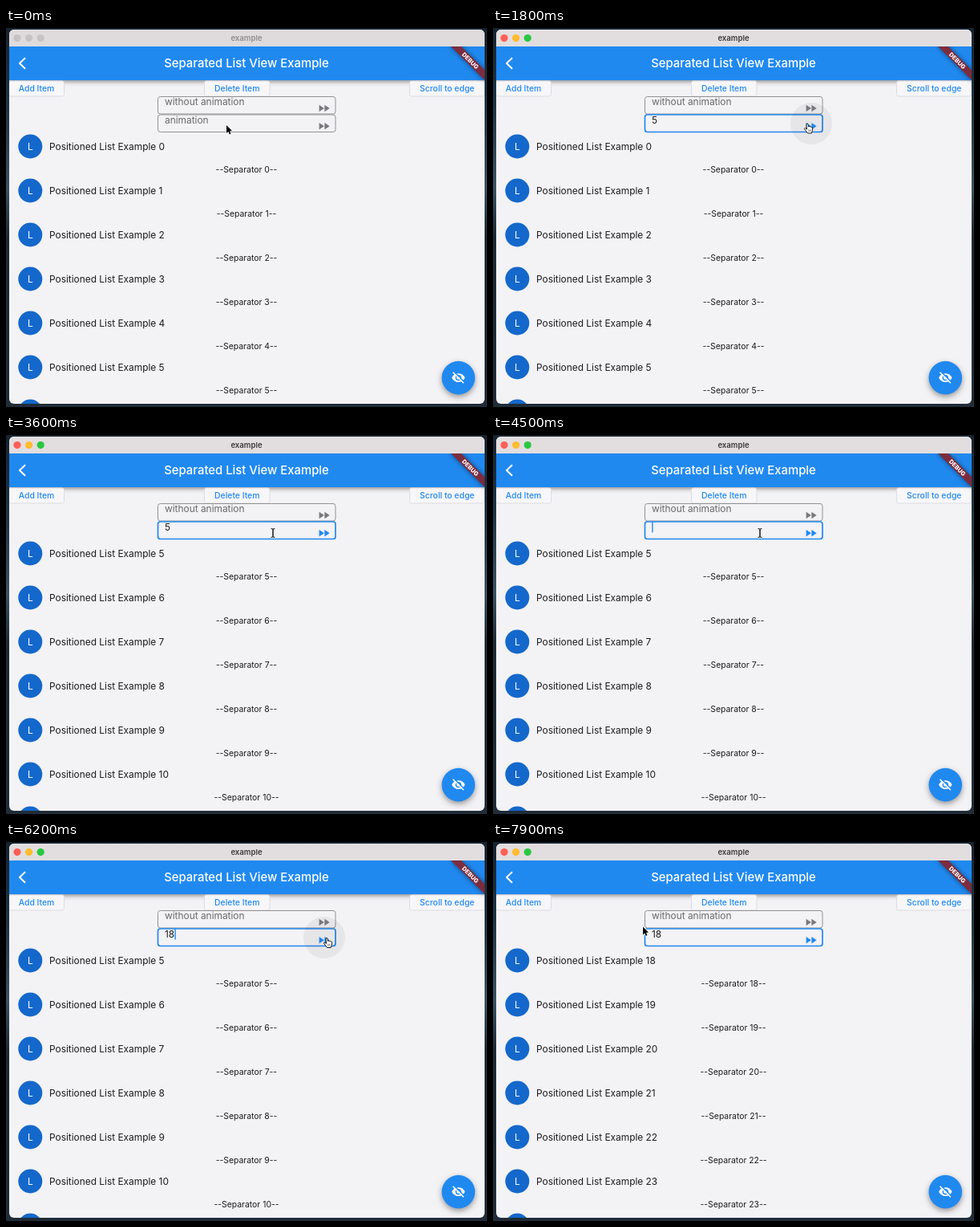
Animation of 600x472 px, one loop 8000 ms. Source, as an HTML page with a canvas:

```html
<!DOCTYPE html>
<html lang="en">
<head>
<meta charset="utf-8">
<title>Separated list</title>
<style>
html, body { margin: 0; width: 100%; height: 100%; overflow: hidden; background: #1b2732; }
canvas { display: block; width: 600px; height: 472px; }
</style>
</head>
<body>
<canvas id="stage"></canvas>
<script>
const canvas = document.getElementById('stage');
const ratio = window.devicePixelRatio || 1;
canvas.width = 600 * ratio;
canvas.height = 472 * ratio;
const c = canvas.getContext('2d');

const LOOP = 8000, STEP = 100, ROW = 55;
const BLUE = '#2089f0', PAPER = '#f3f2f5', INK = '#1c1c1e';

// Pointer stops: time, x, y
const POINTER = [
  [0, 275, 121], [1100, 275, 121], [1700, 392, 119], [2600, 392, 119],
  [3300, 333, 122], [5400, 333, 122], [6000, 400, 119.5],
  [7000, 400, 119.5], [7800, 187, 105.5], [8000, 187, 105.5]
];
// Field contents: time, value
const TYPED = [[0, ''], [900, '5'], [4300, ''], [4700, '1'], [5100, '18']];
// Animated jumps: start, first row before, first row after
const JUMPS = [[1950, 0, 5], [6350, 5, 18]];
const JUMP_TIME = 300, ACTIVE_AT = 400, FOCUS_AT = 500;

const clamp = v => Math.max(0, Math.min(1, v));
const ease = v => v < .5 ? 4 * v ** 3 : 1 - (2 - 2 * v) ** 3 / 2;
const lastBefore = (list, t) => list.filter(k => k[0] <= t).pop();

function pointerAt(t) {
  const i = Math.max(1, POINTER.findIndex(k => k[0] > t));
  const a = POINTER[i - 1], b = POINTER[i];
  const p = ease(clamp((t - a[0]) / (b[0] - a[0])));
  return { x: a[1] + (b[1] - a[1]) * p, y: a[2] + (b[2] - a[2]) * p };
}

function scrollAt(t) {
  const jump = lastBefore(JUMPS, t);
  if (!jump) return { row: 0, bar: 0 };
  const [start, from, to] = jump;
  const row = from + (to - from) * ease(clamp((t - start) / JUMP_TIME));
  const idle = t - start - JUMP_TIME;
  return { row, bar: clamp((t - start) / 100) * (1 - clamp((idle - 600) / 300)) };
}

function text(str, x, y, size, color, weight = 400, align = 'left') {
  c.font = `${weight} ${size}px Inter, Roboto, sans-serif`;
  c.textAlign = align;
  c.fillStyle = color;
  c.fillText(str, x, y);
}

function box(x, y, w, h, r, fill, stroke, line = 1) {
  c.beginPath();
  c.roundRect(x, y, w, h, r);
  if (fill) { c.fillStyle = fill; c.fill(); }
  if (stroke) { c.strokeStyle = stroke; c.lineWidth = line; c.stroke(); }
}

function disc(x, y, r, fill) {
  c.beginPath();
  c.arc(x, y, r, 0, Math.PI * 2);
  c.fillStyle = fill;
  c.fill();
}

function path(points, close) {
  c.beginPath();
  points.forEach(([x, y]) => c.lineTo(x, y));
  if (close) c.closePath();
}

function stroke(color, width) {
  c.strokeStyle = color;
  c.lineWidth = width;
  c.stroke();
}

function shadow(color, blur, y) {
  c.shadowColor = color;
  c.shadowBlur = blur * ratio;
  c.shadowOffsetY = y * ratio;
}

function scoped(draw) {
  c.save();
  draw();
  c.restore();
}

function desktop() {
  const g = c.createLinearGradient(0, 0, 0, 472);
  [[0, '#16232f'], [.2, '#1d3444'], [.42, '#3a5262'], [.55, '#1c2a35'], [1, '#202d38']]
    .forEach(s => g.addColorStop(...s));
  c.fillStyle = g;
  c.fillRect(0, 0, 600, 472);
}

function titleBar(active) {
  c.fillStyle = active ? '#e2dedf' : '#dfdbdc';
  c.fillRect(4, 2, 593, 21);
  const lights = active ? ['#fe5f57', '#febc2e', '#28c840'] : Array(3).fill('#c6c3c5');
  lights.forEach((color, i) => disc(14 + i * 14.6, 12.6, 4.6, color));
  text('example', 300, 16, 9.6, active ? '#3b393a' : '#8f8c8e', 600, 'center');
}

function list(row) {
  scoped(() => {
    c.beginPath();
    c.rect(4, 130, 593, 338);
    c.clip();
    for (let i = Math.max(0, Math.floor(row) - 1); i < row + 7; i++) {
      const y = 147.5 + (i - row) * ROW;
      disc(30.3, y, 15, '#1468cb');
      text('L', 30.3, y + 4.2, 11.9, '#fff', 400, 'center');
      text('Positioned List Example ' + i, 54, y + 4.2, 11.9, INK);
      text(`--Separator ${i}--`, 300, y + 32, 10.4, INK, 400, 'center');
    }
  });
}

function appBar() {
  scoped(() => {
    shadow('rgba(0,0,0,.42)', 5, 2);
    c.fillStyle = BLUE;
    c.fillRect(4, 23, 593, 42);
  });
  path([[24, 37.2], [17, 44], [24, 50.8]]);
  stroke('#fff', 2);
  text('Separated List View Example', 300, 49.2, 14.85, '#fff', 500, 'center');
}

function debugBanner() {
  scoped(() => {
    c.beginPath();
    c.rect(540, 23, 57, 60);
    c.clip();
    c.translate(597, 23);
    c.rotate(Math.PI / 4);
    scoped(() => {
      shadow('rgba(0,0,0,.5)', 6, 0);
      c.fillStyle = '#7d2c3e';
      c.fillRect(-29.7, 20.7, 59.4, 8.9);
    });
    text('DEBUG', 0, 27.8, 7.4, '#fff', 800, 'center');
  });
}

function button(label, x, w) {
  box(x + .5, 66, w, 19, 2.5, '#f7f6f9', '#dddce0');
  text(label, x + w / 2 + .5, 79.4, 10.4, BLUE, 500, 'center');
}

function field(y, focused) {
  box(189.5, y, 221.5, 21.5, 3, null, focused ? BLUE : '#929194', focused ? 1.7 : 1);
}

function forwardIcon(y, color) {
  c.fillStyle = color;
  for (const x of [390.6, 397.4]) {
    path([[x, y - 4.2], [x + 6.3, y], [x, y + 4.2]], true);
    c.fill();
  }
}

function fields(t, hover) {
  const focused = t >= FOCUS_AT;
  const [since, value] = lastBefore(TYPED, t);
  field(85.5, false);
  field(108, focused);
  text('without animation', 198, 96.2, 11.9, '#69686b');
  if (focused) text(value, 198, 118.6, 11.9, INK);
  else text('animation', 198, 118.6, 11.9, '#69686b');

  const caretStart = Math.max(since, FOCUS_AT);
  if (focused && (t - caretStart) % 1000 < 500) {
    c.font = '400 11.9px Inter, Roboto, sans-serif';
    c.fillStyle = BLUE;
    c.fillRect(198.2 + c.measureText(value).width, 107.8, 1.4, 13.6);
  }
  if (hover) disc(397, 119, 26, 'rgba(0,0,0,.055)');
  forwardIcon(100, '#79787b');
  forwardIcon(122.3, focused ? BLUE : '#79787b');
}

function floatingButton() {
  scoped(() => {
    shadow('rgba(0,0,0,.38)', 7, 3);
    disc(564.3, 435.6, 20.8, BLUE);
  });
  scoped(() => {
    c.translate(564.3, 435.6);
    c.beginPath();
    c.moveTo(-8.2, 0);
    c.bezierCurveTo(-5.2, -7.3, 5.2, -7.3, 8.2, 0);
    c.bezierCurveTo(5.2, 7.3, -5.2, 7.3, -8.2, 0);
    c.fillStyle = '#fff';
    c.fill();
    disc(0, 0, 3.7, BLUE);
    disc(0, 0, 2.2, '#fff');
    path([[-5.4, -7.6], [7.6, 5.4]]);
    stroke(BLUE, 1.5);
    path([[-6.8, -6.8], [6.6, 6.6]]);
    stroke('#fff', 1.4);
  });
}

function arrow() {
  path([[0, 0], [0, 10], [2.3, 8], [3.8, 11.4], [5.5, 10.6], [4, 7.4], [7, 7.1]], true);
  stroke('#fff', 1.5);
  c.fillStyle = '#000';
  c.fill();
}

function iBeam() {
  for (const [color, width] of [['rgba(255,255,255,.7)', 2.4], ['#222', 1.1]]) {
    path([[-2.4, -5.4], [-.8, -5.2], [0, -4.4], [0, 4.4], [-.8, 5.2], [-2.4, 5.4]]);
    stroke(color, width);
    path([[2.4, -5.4], [.8, -5.2], [0, -4.4], [0, 4.4], [.8, 5.2], [2.4, 5.4]]);
    stroke(color, width);
  }
}

function hand() {
  path([[-1.1, .6], [0, -.2], [1, .6], [1.6, 4], [2.8, 3.4], [3.6, 4.2], [4.7, 3.8],
    [5.4, 4.7], [6.3, 4.7], [6.7, 6], [6.2, 9.4], [5.3, 12], [.5, 12],
    [-1.3, 9.5], [-3.6, 6.6], [-2.8, 5.5], [-.4, 7]], true);
  c.fillStyle = '#fff';
  c.fill();
  stroke('#1a1a1a', 1);
  path([[1.8, 7.4], [1.9, 10]]);
  stroke('#333', .7);
  path([[3.8, 7.4], [3.8, 10]]);
  stroke('#333', .7);
}

function render(t) {
  const pointer = pointerAt(t), view = scrollAt(t);
  const active = t >= ACTIVE_AT;
  const hover = active && pointer.x > 372 && pointer.x < 422;
  c.setTransform(ratio, 0, 0, ratio, 0, 0);
  c.lineJoin = 'round';
  desktop();
  scoped(() => {
    c.beginPath();
    c.roundRect(4, 2, 593, 466, 6);
    c.clip();
    c.fillStyle = PAPER;
    c.fillRect(4, 2, 593, 466);
    list(view.row);
    if (view.bar) {
      scoped(() => {
        c.globalAlpha = view.bar;
        box(589, 130 + view.row * 11.4, 6, 70, 3, '#d7d6d9');
      });
    }
    appBar();
    titleBar(active);
    button('Add Item', 3, 69);
    button('Delete Item', 247, 81.5);
    button('Scroll to edge', 503, 93.5);
    fields(t, hover);
    floatingButton();
    debugBanner();
  });
  scoped(() => {
    c.translate(pointer.x, pointer.y);
    if (hover) hand();
    else if (active && pointer.x > 190 && pointer.x < 411) iBeam();
    else arrow();
  });
}

function frame() {
  render(Math.floor(performance.now() % LOOP / STEP) * STEP);
  requestAnimationFrame(frame);
}
frame();
</script>
</body>
</html>
```
